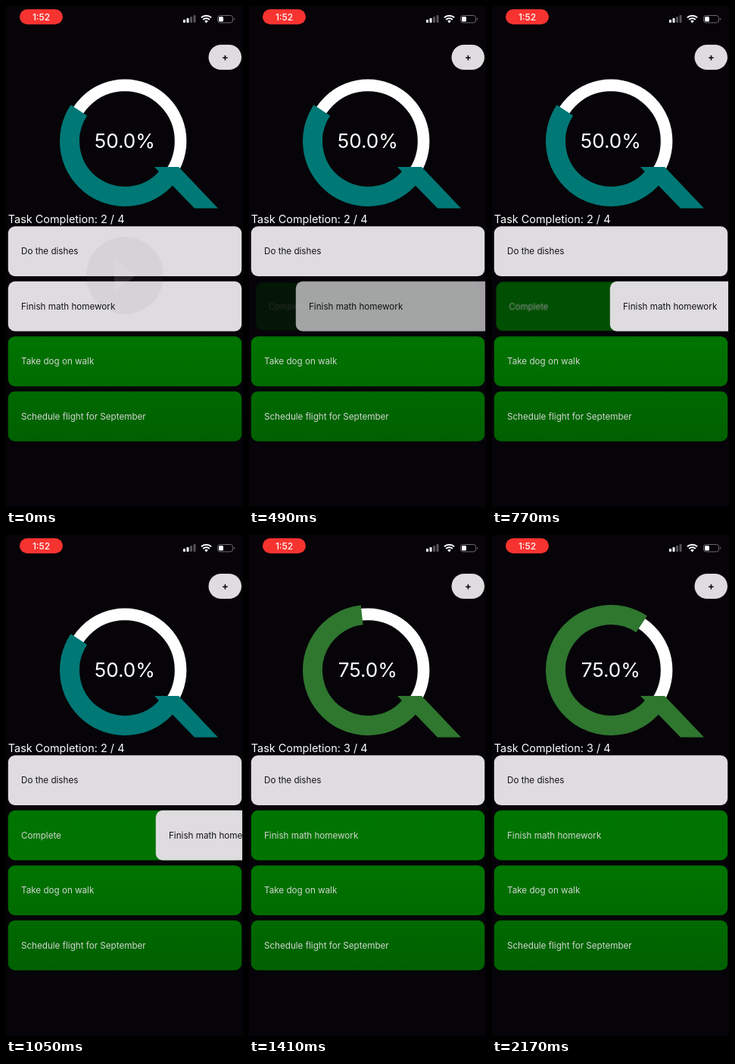
Recreate the animation shown at these times as an HTML page. Size 313x660 px, loop 2.24 s.

```html
<!DOCTYPE html>
<html lang="en">
<head>
<meta charset="utf-8">
<title>Task list</title>
<style>
html, body { margin: 0; width: 100%; height: 100%; overflow: hidden; background: #060408; }
svg { display: block; width: 313px; height: 660px; font-family: Inter, Roboto, "Liberation Sans", sans-serif; }

.label { font-size: 11.65px; fill: #141316; }
.label.done { fill: #d0d5d0; }
.light { fill: #dedcdf; }
.green { fill: url(#green); }
.percent { font-size: 26.1px; fill: #fff; text-anchor: middle; }
.heading { font-size: 14.45px; fill: #fff; }

.before, .after, .ring, .arc, .card, .panel, .play {
  animation: 2240ms step-end infinite;
}
.before { animation-name: before; }
.after { animation-name: after; }
.ring { color: #007876; animation-name: tint; }
.arc { animation-name: arc; }
.card { animation-name: press, slide; }
.panel { animation-name: reveal; transform-origin: 157px 396px; }
.play { animation-name: vanish; }

@keyframes before { 0% { opacity: 1; } 50%, 100% { opacity: 0; } }
@keyframes after { 0% { opacity: 0; } 50%, 100% { opacity: 1; } }
@keyframes tint { 0% { color: #007876; } 50%, 100% { color: #2f762f; } }

@keyframes arc {
  0%, 46.875% { stroke-dasharray: 180 360; }
  50% { stroke-dasharray: 195 360; }
  53.125% { stroke-dasharray: 209 360; animation-timing-function: steps(4); }
  66.07% { stroke-dasharray: 237 360; animation-timing-function: steps(2); }
  72.32%, 100% { stroke-dasharray: 270 360; }
}

@keyframes press {
  0% { opacity: 1; }
  3.125% { opacity: 1; animation-timing-function: steps(3); }
  12.5% { opacity: .18; }
  15.625% { opacity: .18; animation-timing-function: steps(3); }
  25%, 100% { opacity: 1; }
}

@keyframes slide {
  0% { transform: translateX(0); }
  15.625% { transform: translateX(0); animation-timing-function: steps(4); }
  28.125% { transform: translateX(118px); animation-timing-function: steps(4); }
  40.625% { transform: translateX(188px); }
  43.75% { transform: translateX(190px); }
  46.875% { transform: translateX(195px); animation-timing-function: steps(2); }
  53.125% { transform: translateX(273px); }
  56.25% { transform: translateX(296px); }
  59.375% { transform: translateX(306px); }
  62.5%, 100% { transform: translateX(314px); }
}

@keyframes reveal {
  0% { opacity: 0; transform: scale(.95); }
  15.625% { opacity: 0; transform: scale(.95); animation-timing-function: steps(4); }
  28.125% { opacity: .36; transform: scale(.967); animation-timing-function: steps(4); }
  40.625%, 100% { opacity: 1; transform: scale(1); }
}

@keyframes vanish {
  0% { opacity: 1; animation-timing-function: steps(2); }
  6.25%, 100% { opacity: 0; }
}
</style>
</head>
<body>
<svg viewBox="0 0 313 660">
  <defs>
    <linearGradient id="green" gradientUnits="userSpaceOnUse" x1="0" y1="363" x2="0" y2="574">
      <stop offset="0" stop-color="#007400"/>
      <stop offset=".38" stop-color="#007300"/>
      <stop offset="1" stop-color="#006000"/>
    </linearGradient>
    <clipPath id="row"><rect x="2.8" y="360" width="308.4" height="72"/></clipPath>
  </defs>
  <rect width="313" height="660" fill="#060408"/>

  <!-- status bar -->
  <rect x="18" y="4.3" width="57" height="20" rx="10" fill="#f73330"/>
  <text x="46.5" y="18.7" font-size="12" font-weight="500" fill="#fff" text-anchor="middle">1:52</text>
  <g fill="#fff">
    <rect x="234" y="18" width="3" height="4" rx=".8"/>
    <rect x="238.5" y="16" width="3" height="6" rx=".8"/>
    <g fill="#555358">
      <rect x="243" y="14" width="3" height="8" rx=".8"/>
      <rect x="247.5" y="12" width="3" height="10" rx=".8"/>
    </g>
    <path d="M264.5 22.5l-2.3-2.6a3.4 3.4 0 0 1 4.6 0z"/>
  </g>
  <g fill="none" stroke="#fff" stroke-width="2">
    <path d="M260.2 18a6.2 6.2 0 0 1 8.6 0"/>
    <path d="M257.9 15.3a9.6 9.6 0 0 1 13.2 0"/>
  </g>
  <rect x="279.5" y="12.5" width="20" height="9.5" rx="3" fill="none" stroke="#6c6a6f"/>
  <rect x="281" y="14" width="6" height="6.5" rx="1.5" fill="#fff"/>
  <path d="M301 15.5a2 2 0 0 1 0 3.6z" fill="#6c6a6f"/>

  <!-- add button -->
  <rect class="light" x="267.5" y="51" width="43.5" height="33" rx="16.5"/>
  <text x="289.4" y="72.4" font-size="13" font-weight="700" fill="#0b0a0c" text-anchor="middle">+</text>

  <!-- progress ring -->
  <circle cx="157" cy="178" r="73.6" fill="none" stroke="#fff" stroke-width="15.6"/>
  <g class="ring">
    <circle class="arc" cx="157" cy="178" r="73" pathLength="360" transform="rotate(33.8 157 178)"
      fill="none" stroke="currentColor" stroke-width="26" stroke-dasharray="180 360"/>
    <path d="M196 212H228L280 266.5H249z" fill="currentColor"/>
  </g>
  <g class="before">
    <text class="percent" x="156.8" y="187.2">50.0%</text>
    <text class="heading" x="2.8" y="286.4">Task Completion: 2 / 4</text>
  </g>
  <g class="after">
    <text class="percent" x="156.8" y="187.2">75.0%</text>
    <text class="heading" x="2.8" y="286.4">Task Completion: 3 / 4</text>
  </g>

  <!-- tasks -->
  <rect class="light" x="2.8" y="290.3" width="308.4" height="65.7" rx="9"/>
  <text class="label" x="20" y="327.3">Do the dishes</text>

  <g clip-path="url(#row)">
    <g class="panel">
      <rect class="green" x="2.8" y="362.8" width="308.4" height="65.7" rx="9"/>
      <text class="label done before" x="20" y="399.8">Complete</text>
      <text class="label done after" x="20" y="399.8">Finish math homework</text>
    </g>
    <g class="card">
      <rect class="light" x="2.8" y="362.8" width="308.4" height="65.7" rx="9"/>
      <text class="label" x="20" y="399.8">Finish math homework</text>
    </g>
  </g>

  <rect class="green" x="2.8" y="435.2" width="308.4" height="65.7" rx="9"/>
  <text class="label done" x="20" y="472.2">Take dog on walk</text>
  <rect class="green" x="2.8" y="507.7" width="308.4" height="65.7" rx="9"/>
  <text class="label done" x="20" y="544.7">Schedule flight for September</text>

  <!-- fading play badge -->
  <g class="play">
    <circle cx="157" cy="355" r="51" fill="#6b696d" fill-opacity=".07"/>
    <path d="M143 334V376L172 355z" fill="#fff" fill-opacity=".1"/>
  </g>
</svg>
</body>
</html>
```
